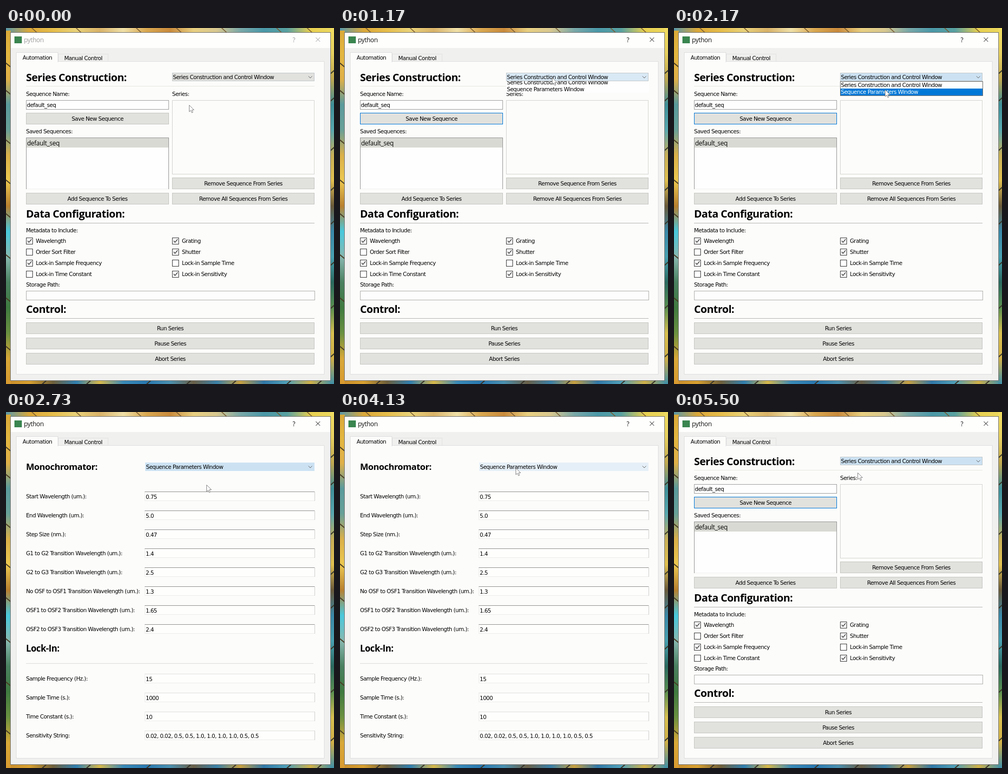
Recreate the animation shown at these times as an HTML page with a canvas. Size 622 by 676 pixels, loop 5.53 s.

```html
<!DOCTYPE html>
<html lang="en">
<head>
<meta charset="utf-8">
<title>python</title>
<style>
  html, body { margin: 0; width: 622px; height: 676px; overflow: hidden; }
  canvas { display: block; }
</style>
</head>
<body>
<canvas id="stage" width="622" height="676"></canvas>
<script>
const ctx = document.getElementById('stage').getContext('2d');
const LOOP = 5530;
const OPEN_A = 1050, SWITCH_A = 2450, OPEN_B = 4400, SWITCH_B = 5300;
const WINDOWS = ['Series Construction and Control Window', 'Sequence Parameters Window'];
const NORMAL = [225, 225, 222], HOT = [229, 239, 247], PRESSED = [204, 226, 243];
const BLUE = '#0078d7', PANEL = '#fcfcfb';

// time, x, y of the pointer tip
const POINTER = [
  [0, 347, 146], [250, 349, 142], [900, 402, 95], [1170, 402, 94],
  [1500, 403, 104], [2000, 400, 117], [2400, 400, 117], [2730, 380, 138],
  [3050, 377, 138], [3900, 336, 108], [4130, 333, 106], [4500, 338, 105],
  [4850, 349, 115], [5250, 349, 116], [5530, 348, 115]
];
const COMBO = [
  [0, ...NORMAL], [700, ...NORMAL], [900, ...HOT], [1050, ...HOT],
  [1300, ...PRESSED], [2750, ...PRESSED], [3150, ...NORMAL], [3750, ...NORMAL],
  [4050, ...HOT], [4400, ...HOT], [4600, ...PRESSED], [5530, ...PRESSED]
];

function track(keys, t) {
  const i = Math.max(1, keys.findIndex(k => k[0] >= t));
  const a = keys[i - 1], b = keys[i];
  const u = (t - a[0]) / (b[0] - a[0]), e = u * u * (3 - 2 * u);
  return a.slice(1).map((v, n) => v + (b[n + 1] - v) * e);
}

function fill(x, y, w, h, color) {
  ctx.fillStyle = color;
  ctx.fillRect(x, y, w, h);
}

function box(x, y, w, h, color, border) {
  fill(x, y, w, h, border);
  fill(x + 1, y + 1, w - 2, h - 2, color);
}

function path(points, color, width = 1) {
  ctx.beginPath();
  points.forEach(([x, y]) => ctx.lineTo(x, y));
  ctx.strokeStyle = color;
  ctx.lineWidth = width;
  ctx.stroke();
}

function write(s, x, y, font, tracking, color = '#000', align = 'left') {
  ctx.font = font;
  ctx.letterSpacing = tracking + 'px';
  ctx.textAlign = align;
  ctx.fillStyle = color;
  ctx.fillText(s, x, y);
}

const label = (s, x, y, color, align) =>
  write(s, x, y, '10.5px "DejaVu Sans", sans-serif', -0.525, color, align);
const text = (s, x, y, color, align) =>
  write(s, x, y, '12px "Open Sans", sans-serif', -0.29, color, align);
const heading = (s, y, size) =>
  write(s, 38, y, `700 ${size}px "Open Sans", sans-serif`, -0.024 * size);

function button(s, x, y, w, border = '#c6c6c2') {
  box(x, y, w, 22, '#e1e1de', border);
  label(s, x + w / 2, y + 15, '#000', 'center');
}

function checkbox(s, x, y, on) {
  box(x, y - 6, 13, 13, '#fff', '#3a3a3a');
  if (on) path([[x + 3, y], [x + 5.5, y + 3], [x + 10.5, y - 3]], '#333', 1.2);
  label(s, x + 18.5, y + 4);
}

function strip(x, y, w, h, down, colors) {
  const g = ctx.createLinearGradient(0, 0, down ? 0 : 622, down ? 676 : 0);
  colors.split(' ').forEach((c, i, all) => g.addColorStop(i / (all.length - 1), '#' + c));
  fill(x, y, w, h, g);
}

function wallpaper() {
  strip(0, 0, 622, 9, false, '5a98a8 dba83a e6bd4a e9d27a d8b268 efe0a8 d9a850 c98a3c e8cf80 d8c890 7aa8a8 4a98a8 58a0a0 e8d050 ecd860');
  strip(0, 668, 622, 8, false, 'c88a2a d8a030 70603a 2f7fb0 d8b84a 3a8ab8 2878b0 4a90b0 6a6048 3a80a8 c8a040 3078a8 50a0b8 d0b048 3a90b0');
  strip(0, 5, 9, 671, true, 'd9a838 e3b640 e0b048 5a9a9c 68a098 dab04a ecc850 b88030 48c8dc 88b8b0 4a8060 3f7a40 6a9040 d8a838 d89a30');
  strip(615, 0, 7, 676, true, 'f0dc60 e6d060 c0a850 3f8f98 58a8b0 c8b058 e0c050 6a5a3a 3a88a8 48a0b0 2a6a60 5a9050 d8c050 d0b048 4090a8');
  for (const y of [66, 118, 212, 288, 352, 430, 512, 604]) {
    path([[-1, y], [10, y + 9]], '#4a3c24', 2);
    path([[614, y + 22], [623, y + 14]], '#3a3a2a', 2);
  }
  for (const x of [48, 132, 246, 322, 408, 512, 570]) {
    path([[x, -1], [x + 12, 10]], '#7a5a30', 1.5);
    path([[x + 20, 677], [x + 30, 668]], '#3a3428', 2);
  }
}

function chrome(active) {
  fill(8, 8, 608, 662, '#70706e');
  fill(9, 9, 606, 660, '#f0f0ef');
  fill(9, 9, 606, 29, '#fefefd');
  const color = active ? '#111' : '#9c9c9c';
  fill(16, 16, 14, 13, '#3a8550');
  text('python', 34, 27, color);
  text('?', 546, 26.5, color, 'center');
  path([[587.5, 18], [595.5, 26]], color);
  path([[595.5, 18], [587.5, 26]], color);
  box(99, 49, 95, 16, '#f0f0ef', '#e2e2e2');
  box(19, 63, 585, 595, PANEL, '#dedede');
  box(19, 46, 80, 19, PANEL, '#dedede');
  fill(20, 62, 78, 4, PANEL);
  label('Automation', 31.5, 60);
  label('Manual Control', 110.5, 61);
}

function combo(x, y, page, t) {
  const color = `rgb(${track(COMBO, t).map(Math.round)})`;
  box(x, y, 585 - x, 16, color, page ? color : '#c2c8ca');
  label(WINDOWS[page], x + 1.5, y + 12);
  path([[573.5, y + 6.5], [577, y + 10], [580.5, y + 6.5]], '#666');
}

function popup(x, y, page, age, pointerY) {
  const shown = Math.min(1, age / 150) * 28;
  const settled = age >= 150;
  const over = Math.floor((pointerY - y) / 13.7);
  const row = over === 0 || over === 1 ? over : page;
  ctx.save();
  ctx.beginPath();
  ctx.rect(x, y, 586 - x, shown);
  ctx.clip();
  ctx.translate(0, shown - 28);
  box(x, y, 586 - x, 28, '#fefefe', settled ? '#6c6c6c' : '#fefefe');
  WINDOWS.forEach((s, i) => {
    const lit = settled && i === row;
    if (lit) fill(x + 1, y + 1 + i * 13, 584 - x, 13, BLUE);
    label(s, x + 1.5, y + 11 + i * 13, lit ? '#fff' : '#000');
  });
  ctx.restore();
}

function constructionPage(t, active) {
  heading('Series Construction:', 101, 20);
  fill(38, 110, 547, 1, '#e6e6e0');
  combo(315, 85, 0, t);
  label('Sequence Name:', 38, 129);
  label('Series:', 315, 129);
  box(38, 137, 271, 18, '#fefefe', '#a0a0a0');
  label('default_seq', 39.5, 150);
  button('Save New Sequence', 38, 161, 271, active ? BLUE : undefined);
  label('Saved Sequences:', 38, 200);
  box(38, 208, 271, 98, '#fefefe', '#969696');
  fill(39, 305, 269, 1, '#f2f2f0');
  fill(39, 209, 269, 18, '#d9d9d4');
  text('default_seq', 40, 223);
  box(315, 137, 270, 141, PANEL, '#d4d4d0');
  button('Remove Sequence From Series', 315, 284, 270);
  button('Add Sequence To Series', 38, 313, 271);
  button('Remove All Sequences From Series', 315, 313, 270);

  heading('Data Configuration:', 360, 20);
  fill(38, 370, 547, 1, '#b6b6b4');
  label('Metadata to Include:', 38, 388);
  [
    ['Wavelength', 1, 'Grating', 1],
    ['Order Sort Filter', 0, 'Shutter', 1],
    ['Lock-in Sample Frequency', 1, 'Lock-in Sample Time', 0],
    ['Lock-in Time Constant', 0, 'Lock-in Sensitivity', 1]
  ].forEach(([left, a, right, b], i) => {
    checkbox(left, 38, 404 + 21 * i, a);
    checkbox(right, 315, 404 + 21 * i, b);
  });
  label('Storage Path:', 38, 491);
  box(38, 499, 548, 18, '#fdfdfd', '#b0b0ae');

  heading('Control:', 541, 20);
  fill(38, 551, 547, 1, '#b6b6b4');
  ['Run', 'Pause', 'Abort'].forEach((s, i) => button(s + ' Series', 38, 559 + 29 * i, 547));
}

function field(name, value, y, top) {
  label(name, 38, y + 4);
  box(263, y - 9, 323, 18, '#fefefd', '#ececea');
  fill(263, y - 9, 323, 1, top);
  fill(585, y - 9, 1, 18, '#cfcfcf');
  label(value, 265, y + 4.5);
}

function parametersPage(t) {
  heading('Monochromator:', 110, 16.7);
  combo(264, 96, 1, t);
  [
    ['Start Wavelength (um.):', '0.75'],
    ['End Wavelength (um.):', '5.0'],
    ['Step Size (nm.):', '0.47'],
    ['G1 to G2 Transition Wavelength (um.):', '1.4'],
    ['G2 to G3 Transition Wavelength (um.):', '2.5'],
    ['No OSF to OSF1 Transition Wavelength (um.):', '1.3'],
    ['OSF1 to OSF2 Transition Wavelength (um.):', '1.65'],
    ['OSF2 to OSF3 Transition Wavelength (um.):', '2.4']
  ].forEach(([name, value], i) => field(name, value, 160 + 36 * i, '#929292'));

  heading('Lock-In:', 455, 17);
  fill(38, 477, 545, 1, '#dcdcda');
  [
    ['Sample Frequency (Hz.):', '15'],
    ['Sample Time (s.):', '1000'],
    ['Time Constant (s.):', '10'],
    ['Sensitivity String:', '0.02, 0.02, 0.5, 0.5, 1.0, 1.0, 1.0, 1.0, 0.5, 0.5']
  ].forEach(([name, value], i) => field(name, value, 506 + 36 * i, '#e0e0dc'));
}

function pointer(x, y) {
  ctx.save();
  ctx.translate(x + 0.5, y + 0.5);
  ctx.beginPath();
  [[0, 0], [0, 12.5], [3, 10], [5, 14.5], [7, 13.5], [5, 9.2], [9, 9]]
    .forEach(([px, py]) => ctx.lineTo(px, py));
  ctx.closePath();
  ctx.fillStyle = '#fff';
  ctx.fill();
  ctx.strokeStyle = '#858585';
  ctx.lineWidth = 1;
  ctx.stroke();
  ctx.restore();
}

function draw(now) {
  const t = now % LOOP;
  const active = t >= OPEN_A;
  const [x, y] = track(POINTER, t);
  wallpaper();
  chrome(active);
  if (t >= SWITCH_A && t < SWITCH_B) {
    parametersPage(t);
    if (t >= OPEN_B) popup(264, 111, 1, t - OPEN_B, y);
  } else {
    constructionPage(t, active);
    if (active && t < SWITCH_A) popup(315, 101, 0, t - OPEN_A, y);
  }
  pointer(x, y);
}

const start = performance.now();
function tick() {
  draw(performance.now() - start);
  requestAnimationFrame(tick);
}
tick();
</script>
</body>
</html>
```
